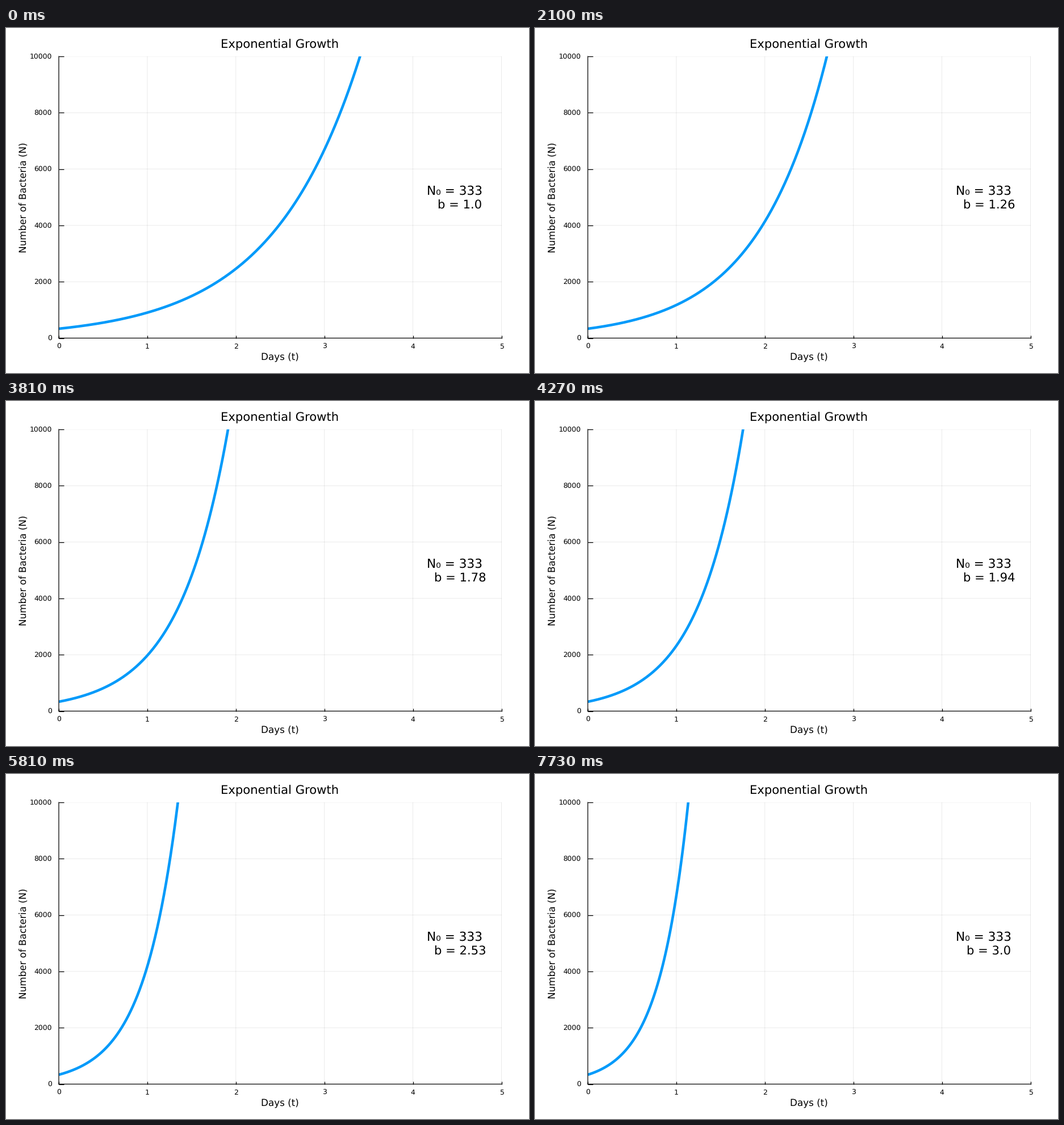
A matplotlib script that plays this animation: 921x608 px, repeating every 8000 ms.

```python
import math
import numpy as np
import matplotlib.pyplot as plt
from matplotlib.animation import FuncAnimation

W, H, DPI = 921, 608, 64
PT = 72 / DPI                                   # points per pixel
LEFT, RIGHT, TOP, BOTTOM = 93, 872.5, 50, 546.5
STEP_MS, LOOP_MS = 20, 8000
HOLD_MS = 40                                    # time between slider updates
N0 = 333

# Growth rate at a few key times (ms, rate)
KEYS = [(450, 1.0), (1620, 1.25), (2100, 1.26), (2900, 1.48), (3780, 1.78),
        (4780, 2.12), (5780, 2.53), (6980, 2.98), (7700, 3.0)]

plt.rcParams.update({"font.family": "DejaVu Sans", "text.hinting": "none",
                     "path.snap": False})
fig = plt.figure(figsize=(W / DPI, H / DPI), dpi=DPI, facecolor="white")
ax = fig.add_axes([LEFT / W, 1 - BOTTOM / H,
                   (RIGHT - LEFT) / W, (BOTTOM - TOP) / H])
ax.set(xlim=(0, 5), ylim=(0, 10000),
       xticks=range(6), yticks=range(0, 10001, 2000))
ax.grid(color="black", alpha=0.1, lw=0.8 * PT)
ax.set_axisbelow(True)
ax.spines[["top", "right"]].set_visible(False)
ax.spines[["left", "bottom"]].set_linewidth(1.25 * PT)
for axis, length in (("x", 5.5), ("y", 9)):
    ax.tick_params(axis=axis, direction="in", length=length * PT,
                   width=1.25 * PT, labelbottom=False, labelleft=False)


def label(x, y, text, size, ha="center", **kw):
    """Place text with its baseline at a pixel position."""
    return fig.text(x / W, 1 - y / H, text, fontsize=size * PT, ha=ha,
                    va="baseline", color="black", **kw)


label(482.5, 35.2, "Exponential Growth", 21.1)
label(482.5, 585.4, "Days (t)", 16.7)
label(36.3, 298.5, "Number of Bacteria (N)", 16.7,
      rotation=90, rotation_mode="anchor")
for i in range(6):
    label(LEFT + i * (RIGHT - LEFT) / 5, 565, str(i), 12.4)
    label(81, BOTTOM - i * (BOTTOM - TOP) / 5 + 4.6, str(2000 * i), 12.4,
          ha="right")
label(790.5, 293.5, f"N₀ = {N0}", 21.6)
rate_text = label(799.3, 319, "", 21.1)

t = np.linspace(0, 5, 401)
curve, = ax.plot([], [], color="#009afa", lw=4.6 * PT,
                 solid_capstyle="butt", solid_joinstyle="round")


def rate_at(ms):
    """Rate at the latest slider update, in steps of 0.01."""
    held = (ms - STEP_MS) // HOLD_MS * HOLD_MS + STEP_MS
    return math.floor(np.interp(held, *zip(*KEYS)) * 100 + 1e-6) / 100


def draw(i):
    b = rate_at(i * STEP_MS + STEP_MS / 2)
    n = N0 * np.exp(b * t)
    shown = n < 20000
    curve.set_data(t[shown], n[shown])
    rate_text.set_text(f"b = {b}")
    return curve, rate_text


anim = FuncAnimation(fig, draw, frames=LOOP_MS // STEP_MS, interval=STEP_MS,
                     repeat=True, repeat_delay=0, blit=False)
plt.show()
```
